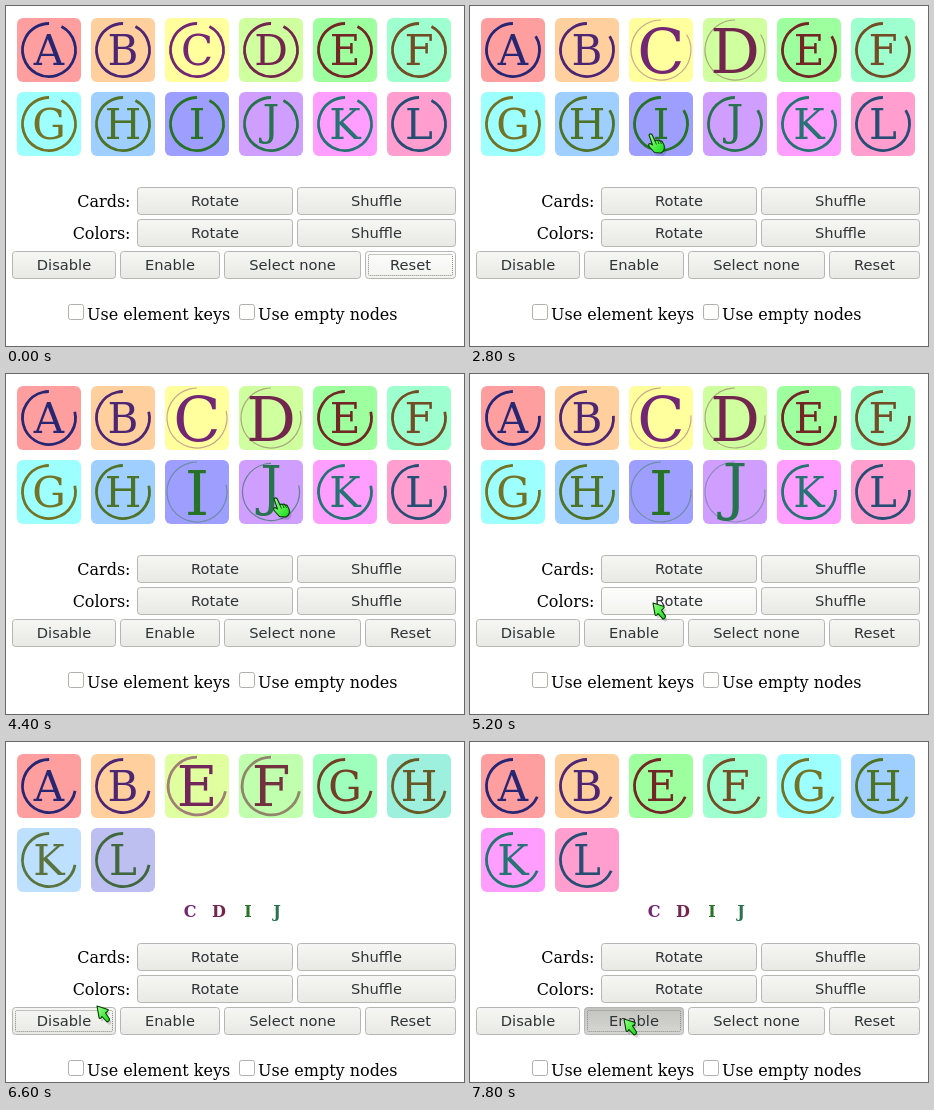
These frames come from a looping animation (458x340 px, 8 s). An HTML page:

```html
<!DOCTYPE html>
<html lang="en">
<head>
<meta charset="utf-8">
<title>Cards</title>
<style>
  html, body { margin: 0; width: 100%; height: 100%; overflow: hidden; background: #fff; }
  svg { display: block; width: 458px; height: 340px; }
  text { font: 16px "DejaVu Serif", serif; }
  .btn text { font: 14.67px "DejaVu Sans", sans-serif; fill: #2e3436; text-anchor: middle; }
  .label { text-anchor: end; }
  .removed text { font-weight: bold; text-anchor: middle; }
  .card text { text-anchor: middle; }
</style>
</head>
<body>
<svg id="stage" viewBox="0 0 458 340">
  <defs>
    <linearGradient id="normal" x2="0" y2="1"><stop stop-color="#f6f6f4"/><stop offset="1" stop-color="#e8e8e4"/></linearGradient>
    <linearGradient id="hover" x2="0" y2="1"><stop stop-color="#fdfdfc"/><stop offset="1" stop-color="#f2f2ef"/></linearGradient>
    <linearGradient id="pressed" x2="0" y2="1"><stop stop-color="#c3c3bf"/><stop offset="1" stop-color="#d6d6d2"/></linearGradient>
    <linearGradient id="green" x2="1" y2="1"><stop stop-color="#9dff8c"/><stop offset="1" stop-color="#12dc12"/></linearGradient>
  </defs>
</svg>
<script>
const LOOP = 8000, STEP = 200, FADE = 700;
const DISABLE_AT = 6300, ENABLE_AT = 7700;
const CLICKS = { C: 1300, D: 1500, I: 2900, J: 4030 };
const ALL = [...'ABCDEFGHIJKL'];
const LEFT = ALL.filter(c => !(c in CLICKS));

// Cursor tip: time, x, y
const PATH = [
  [500, 404, 248], [1250, 194, 58], [1400, 253, 56], [2100, 253, 56], [2700, 179, 128],
  [3300, 179, 128], [4000, 268, 124], [4500, 268, 124], [5000, 205, 222], [6100, 84, 261],
  [6300, 84, 261], [6600, 91, 264], [7200, 93, 264], [7700, 154, 277], [8000, 154, 277]
];

const stage = document.getElementById('stage');
const lerp = (a, b, p) => a + (b - a) * p;
const clamp = p => Math.max(0, Math.min(1, p));
const cubic = p => p < .5 ? 4 * p ** 3 : 1 - (2 - 2 * p) ** 3 / 2;
const progress = (t, start) => cubic(clamp((t - start) / FADE));

function set(node, attrs) {
  for (const k in attrs) node.setAttribute(k, attrs[k]);
  return node;
}
function el(parent, tag, attrs = {}, text = '') {
  const node = set(document.createElementNS('http://www.w3.org/2000/svg', tag), attrs);
  node.textContent = text;
  return parent.appendChild(node);
}

function rgb(h, s, l) {
  const a = s * Math.min(l, 1 - l);
  return [0, 8, 4].map(n => {
    const k = (n + h / 30) % 12;
    return 255 * (l - a * Math.max(-1, Math.min(k - 3, 9 - k, 1)));
  });
}
const back = c => rgb(ALL.indexOf(c) * 30, 1, .81);
const ink = c => rgb(ALL.indexOf(c) * 30 + 240, .5, .3);
const mix = (a, b, p) => `rgb(${a.map((v, i) => Math.round(lerp(v, b[i], p)))})`;

const cards = ALL.map((c, i) => {
  const g = el(stage, 'g', { class: 'card', transform: `translate(${43 + i % 6 * 74} ${i < 6 ? 44 : 118})` });
  return {
    g,
    box: el(g, 'rect', { x: -32, y: -32, width: 64, height: 64, rx: 6 }),
    ring: el(g, 'circle', { fill: 'none', pathLength: 360 }),
    letter: el(g, 'text')
  };
});

const removed = el(stage, 'g', { class: 'removed' });
Object.keys(CLICKS).forEach((c, i) =>
  el(removed, 'text', { x: 184 + i * 29, y: 175, fill: mix(ink(c), ink(c), 0) }, c));

const panel = el(stage, 'g');
el(panel, 'text', { class: 'label', x: 124.5, y: 201 }, 'Cards:');
el(panel, 'text', { class: 'label', x: 124.5, y: 233 }, 'Colors:');

function button(name, x, y, right) {
  const w = right - x, g = el(panel, 'g', { class: 'btn' });
  const face = el(g, 'rect', { x: x + .5, y: y + .5, width: w - 1, height: 27, rx: 3, stroke: '#b5b5b1' });
  const focus = el(g, 'rect', {
    x: x + 3.5, y: y + 3.5, width: w - 7, height: 21, rx: 1,
    fill: 'none', stroke: '#8a8a86', 'stroke-dasharray': '1 1'
  });
  el(g, 'text', { x: x + w / 2, y: y + 19 }, name);
  return { name, x, y, right, face, focus };
}
const buttons = [
  ['Rotate', 131, 181, 287], ['Shuffle', 291, 181, 450],
  ['Rotate', 131, 213, 287], ['Shuffle', 291, 213, 450],
  ['Disable', 6, 245, 110], ['Enable', 114, 245, 214],
  ['Select none', 218, 245, 355], ['Reset', 359, 245, 450]
].map(b => button(...b));

[[62, 'Use element keys'], [233, 'Use empty nodes']].forEach(([x, label]) => {
  el(panel, 'rect', { x: x + .5, y: 298.5, width: 15, height: 15, rx: 2, fill: '#fff', stroke: '#b0b0ac' });
  el(panel, 'text', { x: x + 19, y: 314 }, label);
});

function pointer(d, creases = '') {
  const g = el(stage, 'g');
  el(g, 'path', { d, transform: 'translate(2 3)', opacity: .15 });
  el(g, 'path', { d, fill: 'url(#green)', stroke: '#063b06', 'stroke-width': 1.1, 'stroke-linejoin': 'round' });
  el(g, 'path', { d: creases, fill: 'none', stroke: '#063b06', 'stroke-width': .8 });
  return g;
}
const arrow = pointer('M0 0L11 3.5Q12 4.5 8.5 7L12.5 13Q12.5 15.5 10 16L5 10.5Q3 14 2 11.5Z');
const hand = pointer(
  'M0 1Q1 -1 3 .5L6 7Q7 5.500 8.500 6.500Q10 5.500 11 7Q13 6.500 14 9Q16.500 13 14.500 17L12 19L5.500 18.500L.5 13Q-1.500 10 1 9.500L3.500 11Z',
  'M6 7L7.500 10.500M8.700 6.700L10 10M11 7L12.500 10'
);

function tipAt(t) {
  const i = PATH.findIndex(k => k[0] > t);
  if (i < 1) return PATH[i ? PATH.length - 1 : 0].slice(1);
  const a = PATH[i - 1], b = PATH[i], p = (t - a[0]) / (b[0] - a[0]);
  return [lerp(a[1], b[1], p), lerp(a[2], b[2], p)];
}

function drawCards(t, gone) {
  const gap = 28 + 11 * t / 1000;
  const change = progress(t, DISABLE_AT);
  cards.forEach(({ g, box, ring, letter }, i) => {
    const from = ALL[i], c = gone ? LEFT[i] : from;
    g.style.display = c ? '' : 'none';
    if (!c) return;
    const clicked = t >= CLICKS[from];
    const big = clicked ? progress(t, CLICKS[from]) * (1 - change) : 0;
    const size = lerp(42, 62, big);
    const color = mix(ink(from), ink(c), change);
    set(box, { fill: mix(back(from), back(c), change) });
    set(ring, {
      r: lerp(26.5, 30, big), stroke: color,
      'stroke-width': clicked && !gone ? 1.2 : 2.8,
      'stroke-opacity': lerp(1, .4, big),
      'stroke-dasharray': `${360 - gap} 360`,
      transform: `rotate(${gap - 90})`
    });
    letter.textContent = c;
    letter.style.fontSize = size + 'px';
    set(letter, { y: size * (c === 'J' ? .25 : .364), fill: color });
  });
}

function drawPanel(t, x, y, shift) {
  const focused = t < CLICKS.C ? 'Reset' : t < DISABLE_AT ? '' : t < ENABLE_AT ? 'Disable' : 'Enable';
  set(panel, { transform: `translate(0 ${shift})` });
  buttons.forEach(b => {
    const over = x >= b.x && x < b.right && y - shift >= b.y && y - shift < b.y + 28;
    const down = b.name === 'Enable' && t >= ENABLE_AT;
    set(b.face, { fill: `url(#${down ? 'pressed' : over ? 'hover' : 'normal'})` });
    b.focus.style.display = b.name === focused ? '' : 'none';
  });
}

function draw(ms) {
  let t = Math.floor(ms % LOOP / STEP) * STEP;
  if (t < 400) t = 0;
  const gone = t >= DISABLE_AT;
  const [x, y] = tipAt(t);
  drawCards(t, gone);
  drawPanel(t, x, y, gone ? 20 : 0);
  removed.style.display = gone ? '' : 'none';
  const onCard = y < 150 && (x - 11) % 74 < 64;
  for (const [node, on] of [[hand, onCard], [arrow, !onCard]]) {
    node.style.display = on && t >= 400 ? '' : 'none';
    set(node, { transform: `translate(${x} ${y})` });
  }
}

const start = performance.now();
function tick() {
  draw(performance.now() - start);
  requestAnimationFrame(tick);
}
tick();
</script>
</body>
</html>
```
